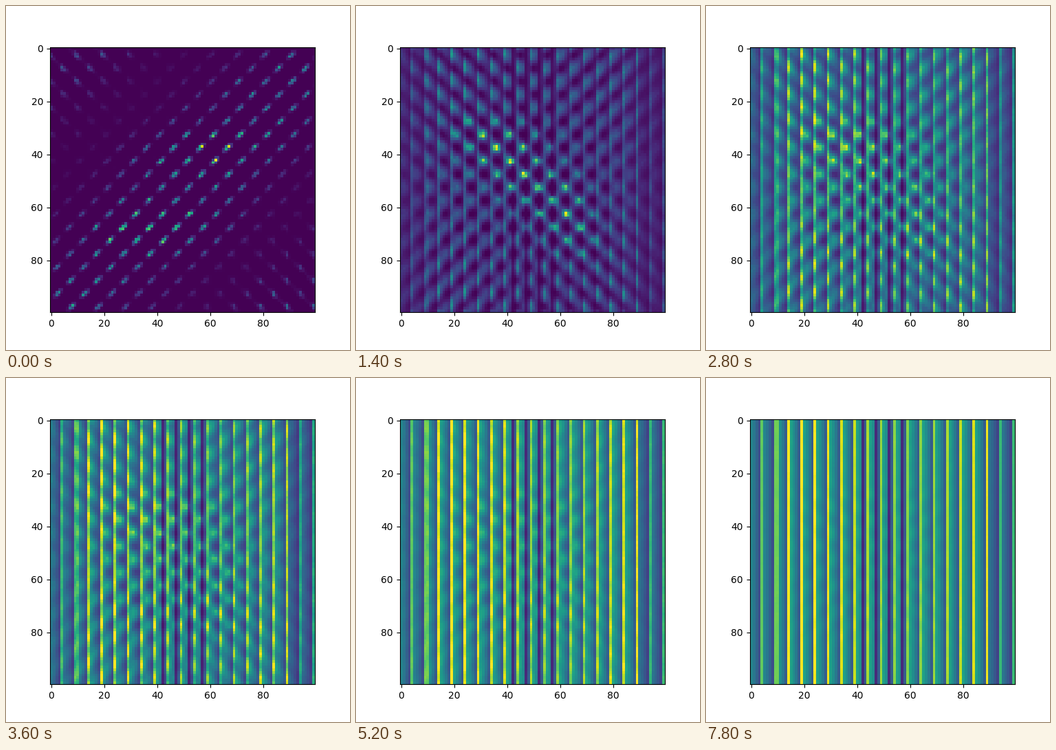
Write a matplotlib script that moves like this. It is 500x500 px and loops after 8 s.

```python
import numpy as np
import matplotlib.pyplot as plt
from matplotlib.animation import FuncAnimation

N = 100
CELL = 5
FRAMES = 40
INTERVAL = 200

i, j = np.mgrid[0:N, 0:N].astype(float)
grain = np.random.default_rng(7).uniform(-1, 1, (N, N))


def bump(x, centre, width, power=2):
    return np.exp(-np.abs((x - centre) / width) ** power)


def limit_row():
    """Column levels that every row settles to."""
    cell, u = np.divmod(np.arange(N), CELL)
    body = .57 - .065 * u - .009 * u ** 2
    peak = .91 + .09 * np.cos(np.pi * (cell - 3) / 8)
    row = np.where(u == CELL - 1, peak, body)
    row[:10] *= .8
    row[90:] *= .68
    row[10] = row[9]
    row[42:58:CELL] = .12
    return row


level = limit_row()

# Two crossing stripe families form the alternating lattice.
# Away from the centre, the family pointing outwards dominates.
u = i - 2.4
v = j - (1.7 + .035 * (i - 50) + .015 * (j - 50))
rising = np.cos(np.pi * (u + v) / CELL)
falling = np.cos(np.pi * (u - v) / CELL)
lean = .5 + .32 * np.tanh((i - 52) * (j - 48) / 900)
lattice = (1 - lean) * rising + lean * falling
spots = np.maximum(0, (rising + falling) / 2)

core = bump(i, 54, 28, 6) * bump(j, 45, 28, 6)
grip = .35 + .65 * bump(j, 47, 42, 6)

# Opening pattern: dashes along the anti-diagonal, ticks in two corners.
dash = np.maximum(0, rising) ** 6 * (.5 + .5 * falling) ** 1.8
flare = core * bump(np.abs(i - 54), 15, 9)
band = bump(i + j, 104, 30) * (.52 + .6 * flare)
corners = bump(i + j, 0, 32) + bump(i + j, 2 * N - 2, 36)
ticks = np.maximum(0, lattice) ** 4 * corners * .4 * level
start = (dash * band + ticks) * (1 + .35 * grain)


def matrix(n):
    base = 1 - np.exp(-((n + .8) / 13.2) ** 2.1)
    inner = .95 * np.exp(-.085 * (n - 10))
    outer = .65 * np.exp(-.13 * (n - 10))
    depth = (outer + (inner - outer) * core) * grip
    rough = 1 + .16 * np.exp(-n / 12) * grain
    field = base * level * np.maximum(0, 1 + depth * lattice) * rough

    height = (1 - np.exp(-n / 1.5)) * np.exp(-(n / 14) ** 2)
    spread = bump(i - j, 0, 9 + n)
    dots = height * spots ** 2.5 * core * spread * (1 + .25 * grain)

    return np.clip(field + dots + np.exp(-n / 1.6) * start, 0, 1)


fig, ax = plt.subplots(figsize=(5, 5), dpi=100)
image = ax.imshow(matrix(0), cmap="viridis", vmin=0, vmax=1)


def update(n):
    image.set_data(matrix(n))
    return [image]


def reset():
    return update(0)


anim = FuncAnimation(fig, update, frames=FRAMES, init_func=reset,
                     interval=INTERVAL, repeat=True, repeat_delay=0)
plt.show()
```
